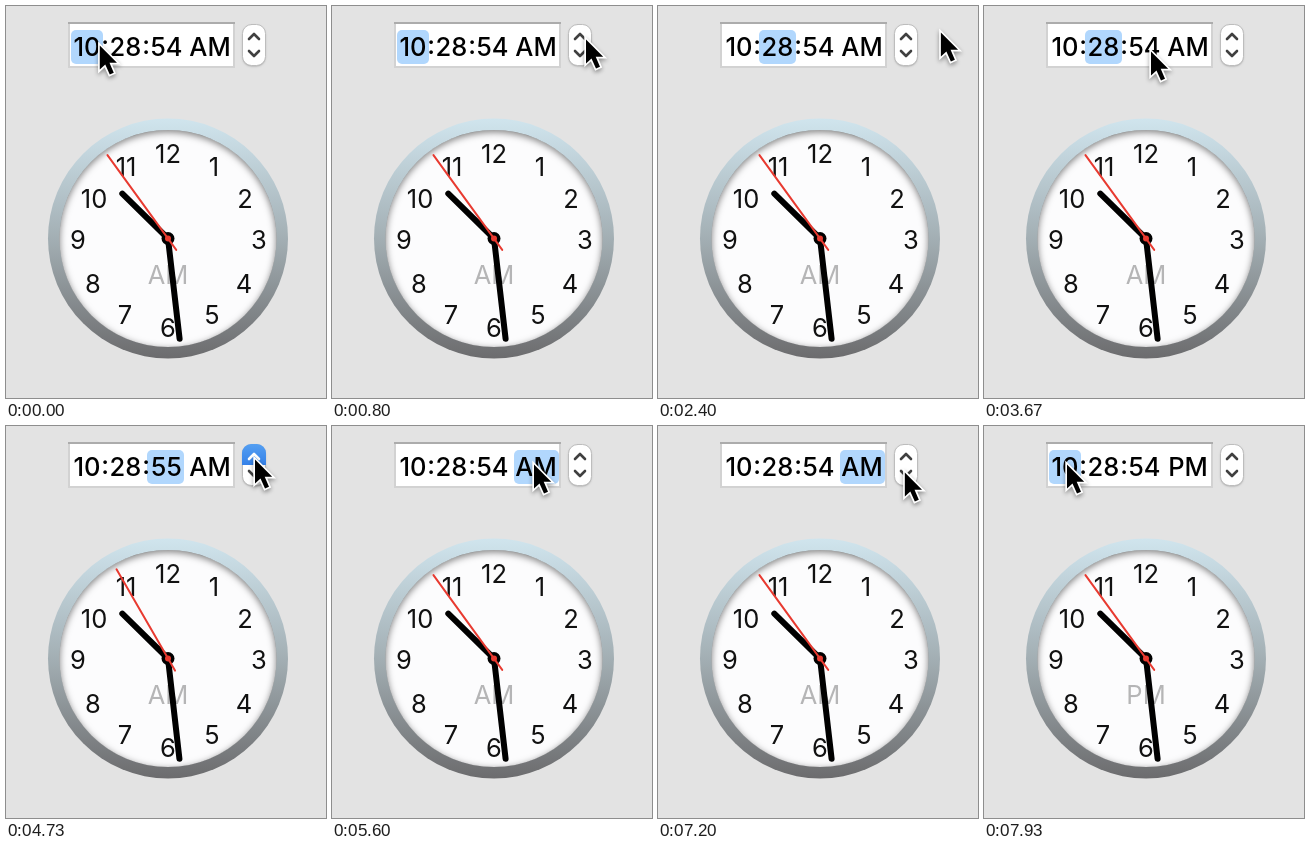
Animation of 320x392 px, one loop 8000 ms. Source, as an HTML page with a canvas:

```html
<!DOCTYPE html>
<html lang="en">
<head>
<meta charset="utf-8">
<title>Date picker clock</title>
<style>
  html, body { margin: 0; width: 100%; height: 100%; overflow: hidden; background: #e3e3e3; }
  canvas { display: block; width: 320px; height: 392px; }
</style>
</head>
<body>
<canvas id="stage"></canvas>
<script>
const W = 320, H = 392, LOOP = 8000;
const canvas = document.getElementById('stage');
const ctx = canvas.getContext('2d');
const scale = window.devicePixelRatio || 1;
canvas.width = W * scale;
canvas.height = H * scale;

const FONT = 'Inter, Roboto, sans-serif';
const CENTER = { x: 162, y: 232.5 };

// Pointer path: [time, x, y]
const pointerPath = [
  [0, 91, 35], [67, 194, 40], [133, 340, 44], [333, 340, 44], [400, 300, 44], [533, 252, 43],
  [667, 252, 43], [800, 252, 29], [1070, 252, 29], [1200, 252, 43], [1667, 252, 43],
  [1867, 116, 40], [2000, 116, 40], [2267, 281, 22], [2400, 281, 22], [2533, 247, 29],
  [3000, 247, 29], [3133, 247, 42], [3400, 247, 42], [3667, 165, 41], [4000, 157, 38],
  [4267, 298, 24], [4400, 298, 24], [4533, 247, 29], [4933, 247, 29], [5067, 247, 42],
  [5333, 247, 42], [5600, 200, 34], [5800, 200, 34], [5933, 233, 29], [6133, 241, 27],
  [6800, 241, 27], [6933, 245, 42], [7200, 245, 42], [7667, 85, 36], [7800, 85, 36], [7933, 81, 34]
];

// Stepper presses: [start, end, direction, unit]
const presses = [
  [867, 1000, 1, 'hour'], [1467, 1667, -1, 'hour'],
  [2733, 2867, 1, 'minute'], [3333, 3400, -1, 'minute'],
  [4667, 4800, 1, 'second'], [5200, 5333, -1, 'second'],
  [6600, 6733, 1, 'half'], [7000, 7133, -1, 'half']
];

const selections = [[0, 'hour'], [1933, 'minute'], [3933, 'second'], [5600, 'half'], [7733, 'hour']];

const fields = {
  hour: { x: 65, w: 32, text: 81 },
  minute: { x: 101, w: 37, text: 119.5 },
  second: { x: 141, w: 37, text: 160.5 },
  half: { x: 182, w: 45, text: 204 }
};

const numerals = [[162, 147], [208, 160], [239, 192], [253, 233], [238, 277], [206, 308],
                  [162, 321], [119, 308], [87, 277], [72, 233], [88, 192], [120, 160]];

function pointerAt(t) {
  const i = pointerPath.findIndex(p => p[0] > t);
  if (i < 0) return pointerPath[pointerPath.length - 1].slice(1);
  const [t0, x0, y0] = pointerPath[i - 1], [t1, x1, y1] = pointerPath[i];
  const k = (t - t0) / (t1 - t0);
  return [x0 + (x1 - x0) * k, y0 + (y1 - y0) * k];
}

function stateAt(t) {
  const state = { hour: 10, minute: 28, second: 54, half: 0, pressed: 0 };
  for (const [start, end, direction, unit] of presses) {
    if (t >= start) state[unit] += direction;
    if (t >= start && t < end) state.pressed = direction;
  }
  if (t >= 7866) state.half = 1;
  state.selected = selections.filter(s => t >= s[0]).pop()[1];
  return state;
}

function roundRect(x, y, w, h, r, fill) {
  ctx.beginPath();
  ctx.roundRect(x, y, w, h, r);
  ctx.fillStyle = fill;
  ctx.fill();
}

function circle(r, fill) {
  ctx.beginPath();
  ctx.arc(CENTER.x, CENTER.y, r, 0, Math.PI * 2);
  ctx.fillStyle = fill;
  ctx.fill();
}

function label(text, x, baseline, color = '#000', weight = 400, size = 25.5) {
  ctx.font = `${weight} ${size}px ${FONT}`;
  ctx.textAlign = 'center';
  ctx.fillStyle = color;
  ctx.fillText(text, x, baseline);
}

function line(points, color, width) {
  ctx.beginPath();
  points.forEach(([x, y]) => ctx.lineTo(x, y));
  ctx.strokeStyle = color;
  ctx.lineWidth = width;
  ctx.stroke();
}

function gradient(y0, y1, ...colors) {
  const g = ctx.createLinearGradient(0, y0, 0, y1);
  colors.forEach((c, i) => g.addColorStop(i / (colors.length - 1), c));
  return g;
}

function drawField(state, half) {
  ctx.fillStyle = '#d2d2d2';
  ctx.fillRect(62, 16, 167, 46);
  ctx.fillStyle = '#fff';
  ctx.fillRect(64, 18, 163, 42);
  ctx.fillStyle = '#acacac';
  ctx.fillRect(62, 16, 167, 2);
  const box = fields[state.selected];
  roundRect(box.x, 24, box.w, 34, 5, '#b1d7fd');
  const texts = { ...state, half };
  for (const name in fields) label(texts[name], fields[name].text, 50, '#000', 450);
  label(':', 99, 48, '#000', 450);
  label(':', 140, 48, '#000', 450);
}

function drawStepper(pressed) {
  ctx.save();
  ctx.shadowColor = 'rgba(0,0,0,.25)';
  ctx.shadowBlur = 2 * scale;
  ctx.shadowOffsetY = scale;
  roundRect(236.5, 18.5, 23, 41, 9, '#fff');
  ctx.restore();
  ctx.strokeStyle = '#bdbdbd';
  ctx.lineWidth = 1;
  ctx.stroke();
  if (pressed > 0) roundRect(236, 18, 24, 21, [9, 9, 0, 0], gradient(18, 39, '#549ff2', '#3581e8'));
  if (pressed < 0) roundRect(236, 39, 24, 21, [0, 0, 9, 9], gradient(39, 60, '#3581e8', '#1760d9'));
  line([[243, 33], [248, 28], [253, 33]], pressed > 0 ? '#fff' : '#404040', 2.6);
  line([[243, 45], [248, 50], [253, 45]], pressed < 0 ? '#fff' : '#404040', 2.6);
}

function drawHand(degrees, length, tail, color, width) {
  const a = degrees * Math.PI / 180, dx = Math.sin(a), dy = -Math.cos(a);
  line([[CENTER.x - dx * tail, CENTER.y - dy * tail],
        [CENTER.x + dx * length, CENTER.y + dy * length]], color, width);
}

function drawClock({ hour, minute, second }, half) {
  circle(120, gradient(112, 352, '#d0e5ee', '#a3afb4', '#6c6c6e'));
  circle(108.5, '#fcfcfd');
  // Soft shade inside the rim, heavier at the top
  ctx.save();
  ctx.clip();
  ctx.shadowColor = 'rgba(0,0,0,.5)';
  ctx.shadowBlur = 7 * scale;
  ctx.shadowOffsetY = 2 * scale;
  ctx.beginPath();
  ctx.arc(CENTER.x, CENTER.y, 114, 0, Math.PI * 2);
  ctx.strokeStyle = '#888';
  ctx.lineWidth = 11;
  ctx.stroke();
  ctx.restore();

  numerals.forEach(([x, y], i) => label(i || 12, x, y + 9.5, '#111'));
  label(half, CENTER.x, 278, '#b5b5b6');

  const minutes = minute + second / 60;
  drawHand((hour + minutes / 60) * 30, 64, 0, '#000', 6);
  drawHand(minutes * 6, 101, 0, '#000', 6);
  circle(6.5, '#000');
  drawHand(second * 6, 103, 14, '#e83a30', 2);
  circle(3, '#e83a30');
}

function drawPointer([x, y]) {
  ctx.save();
  ctx.translate(x, y);
  ctx.beginPath();
  [[2, 4.5], [2, 28.5], [7.5, 23.5], [12, 33.5], [16, 31.7], [11.7, 21.8], [19.2, 21.8]]
    .forEach(([px, py]) => ctx.lineTo(px, py));
  ctx.closePath();
  ctx.lineJoin = 'miter';
  ctx.lineWidth = 3.4;
  ctx.strokeStyle = '#fff';
  ctx.shadowColor = 'rgba(0,0,0,.4)';
  ctx.shadowBlur = 4 * scale;
  ctx.shadowOffsetY = 2 * scale;
  ctx.stroke();
  ctx.shadowColor = 'transparent';
  ctx.fillStyle = '#000';
  ctx.fill();
  ctx.restore();
}

function render(now) {
  const t = Math.floor((now % LOOP + 5) * 0.015) / 0.015 % LOOP + 0.5;
  const state = stateAt(t), half = state.half ? 'PM' : 'AM';
  ctx.setTransform(scale, 0, 0, scale, 0, 0);
  ctx.lineCap = ctx.lineJoin = 'round';
  ctx.fillStyle = '#e3e3e3';
  ctx.fillRect(0, 0, W, H);
  drawField(state, half);
  drawStepper(state.pressed);
  drawClock(state, half);
  drawPointer(pointerAt(t));
}

const begin = performance.now();
function frame() {
  render(performance.now() - begin);
  requestAnimationFrame(frame);
}
frame();
</script>
</body>
</html>
```
